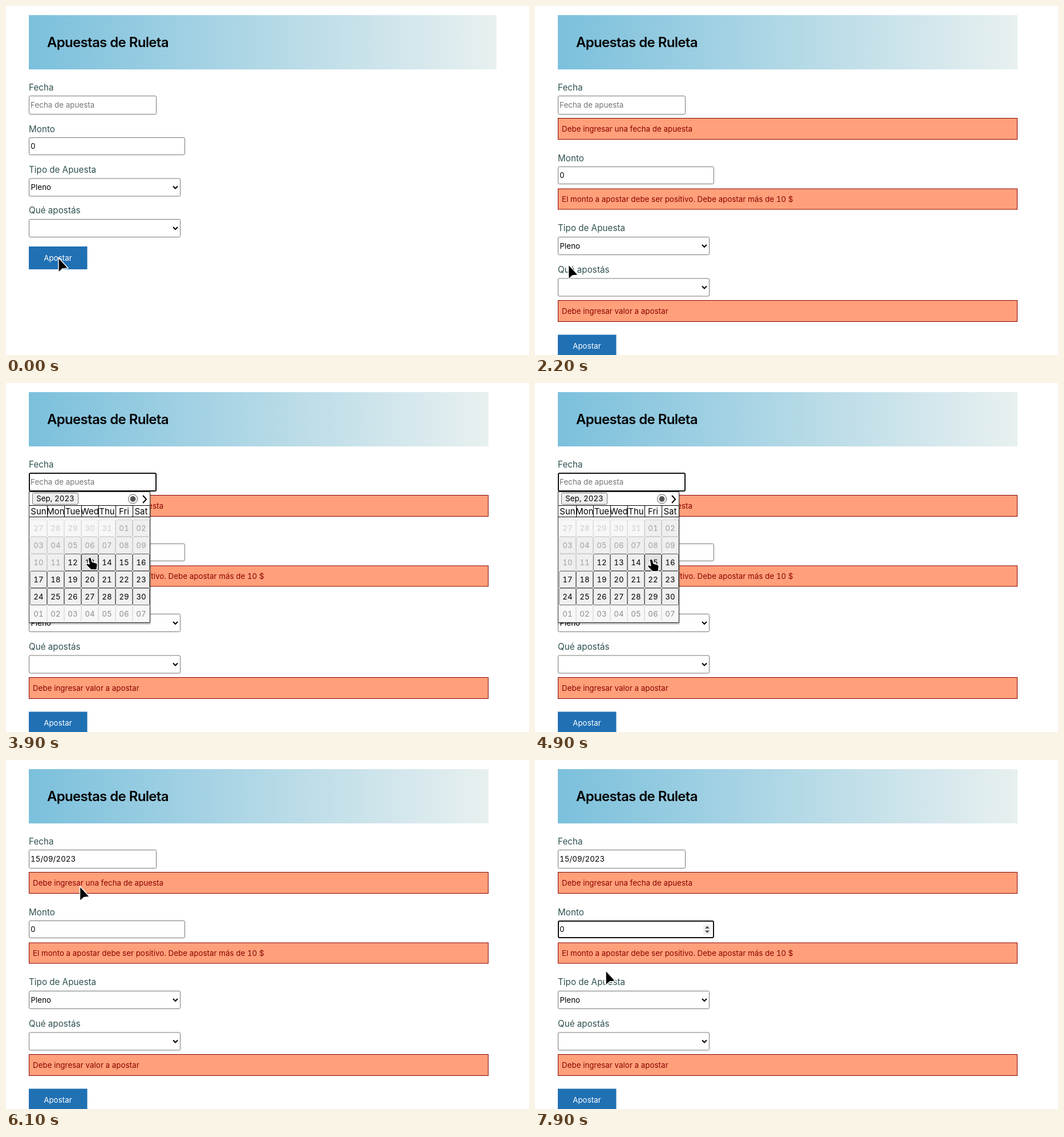
An HTML page that plays this animation: 917 px wide and 611 px high, repeating every 8000 ms.

```html
<!DOCTYPE html>
<html lang="es">
<head>
<meta charset="utf-8">
<title>Apuestas de Ruleta</title>
<style>
  html, body { margin: 0; width: 100%; height: 100%; overflow: hidden; background: #fff; }
  svg {
    display: block; width: 917px; height: 611px;
    font: 13.33px Inter, sans-serif; font-optical-sizing: none;
    font-variant-numeric: tabular-nums; letter-spacing: .05px;
  }
  .title { font-size: 24px; font-weight: 600; letter-spacing: -.7px; }
  .label { font-size: 15.2px; }
  .head { font-size: 15px; }
  .mid { text-anchor: middle; }
</style>
</head>
<body>
<svg viewBox="0 0 917 611">
  <defs>
    <linearGradient id="sky"><stop stop-color="#7bc0dc"/><stop offset="1" stop-color="#e8f0f0"/></linearGradient>
    <filter id="soft" x="-10%" y="-10%" width="120%" height="120%"><feGaussianBlur stdDeviation="1.6"/></filter>
  </defs>
  <g id="page"></g>
  <g id="cursor"></g>
</svg>
<script>
const LOOP = 8000, STEP = 100, BLINK = 600;
const ERRORS = 900, OPEN = 3100, PICKED = 5300, FOCUS = 7100;

const MOVES = [
  { from: 1600, to: 1800, x: 55, y: 556 },
  { from: 2100, to: 2400, x: 66, y: 247 },
  { from: 2500, to: 2900, x: 66, y: 175, ease: k => 1 - (1 - k) ** 4 },
  { from: 3600, to: 3900, x: 147, y: 306 },
  { from: 3900, to: 4400, x: 204, y: 309, ease: k => 1 - (1 - k) ** 2 },
  { from: 5200, to: 5500, x: 200, y: 304 },
  { from: 5500, to: 6300, x: 106, y: 194 },
  { from: 6300, to: 6700, x: 87, y: 289 },
  { from: 7500, to: 7900, x: 124, y: 369, ease: k => k ** 1.3 }
];

const page = document.getElementById('page');
const cursor = document.getElementById('cursor');

const rect = (x, y, w, h, fill, stroke = 'none', sw = stroke === 'none' ? 0 : 1, r = 0) =>
  `<rect x="${x + sw / 2}" y="${y + sw / 2}" width="${w - sw}" height="${h - sw}" rx="${r}" fill="${fill}" stroke="${stroke}" stroke-width="${sw}"/>`;
const text = (x, y, s, cls = '', fill = '#000') =>
  `<text x="${x}" y="${y}" class="${cls}" fill="${fill}">${s}</text>`;
const line = (d, w = 1, color = '#000') =>
  `<path d="${d}" fill="none" stroke="${color}" stroke-width="${w}"/>`;
const disc = (r, fill) =>
  `<circle cx="222.5" cy="203" r="${r}" fill="${fill}" stroke="#555"/>`;
const label = (y, s) => text(40, y, s, 'label', '#2f4f4f');
const inside = (p, x, y, w, h) => p.x >= x && p.x < x + w && p.y >= y && p.y < y + h;

function pointAt(t) {
  let p = { x: 92, y: 441 };
  for (const { from, to, x, y, ease = k => k } of MOVES) {
    if (t <= from) break;
    const k = ease(Math.min(1, (t - from) / (to - from)));
    p = { x: p.x + (x - p.x) * k, y: p.y + (y - p.y) * k };
  }
  return p;
}

function field(y, w, h, hover, focus) {
  return focus ? rect(40, y, w, h, '#fff', '#101010', 2, 2)
               : rect(40, y, w, h, '#fff', hover ? '#444' : '#767676', 1, 2);
}

function caret(x, y, since, t) {
  return Math.floor((t - since) / BLINK) % 2 ? '' : rect(x, y, 1, 16, '#000');
}

function select(y, value) {
  return field(y, 266, 32) + text(43.5, y + 20.5, value) + line(`M293 ${y + 14}l4 4 4-4`, 2);
}

function error(y, h, s) {
  return rect(40, y, 806, h, '#ffa07a', '#8b0000') + text(47, y + 23.5, s, '', '#8b0000');
}

function spinner(y) {
  return rect(295, y + 7, 14, 17, '#efefef') +
    `<path d="M298 ${y + 14}l4-4.5 4 4.5zM298 ${y + 17.5}l4 4.5 4-4.5z" fill="#505050"/>`;
}

function dayCell(i, p) {
  const x = 42 + i % 7 * 30, y = 239 + Math.floor(i / 7) * 30, n = i - 4;
  const before = n < 1, after = n > 30, other = before || after, off = other || n < 12;
  const day = before ? n + 31 : after ? n - 30 : n;
  const hover = !off && inside(p, x, y, 30, 30);
  const bg = hover ? '#e3e3e3' : other ? '#f7f7f7' : '#efefef';
  const edge = hover ? '#444' : other ? '#e2e2e2' : off ? '#cfcfcf' : '#767676';
  const ink = before ? '#cdcdcd' : after ? '#8c8c8c' : off ? '#a0a0a0' : '#000';
  return rect(x, y, 30, 30, bg, edge, 1, 1.5) +
    text(x + 15, y + 19.8, String(day).padStart(2, '0'), 'mid', ink);
}

function calendar(p) {
  let s = '<rect x="41" y="192" width="212" height="230" opacity=".35" filter="url(#soft)"/>' +
    rect(40, 190, 213, 230, '#fff', '#333') +
    rect(46, 192, 81, 21, '#efefef', '#767676', 1, 2) + text(86.5, 207, 'Sep, 2023', 'mid') +
    disc(8, '#fff') + disc(4.5, '#555') +
    line('M240 197l6 6.5-6 6.5', 2) + line('M41 214.5H252M41 234.5H252');
  'Sun Mon Tue Wed Thu Fri Sat'.split(' ').forEach((d, i) => {
    s += text(57 + i * 30, 230, d, 'head mid') + line(`M${72.5 + i * 30} 215v20`);
  });
  for (let i = 0; i < 42; i++) s += dayCell(i, p);
  return s;
}

function drawPage(t, p) {
  const bad = t >= ERRORS, open = t >= OPEN && t < PICKED, picked = t >= PICKED, focus = t >= FOCUS;
  const [amount, kind, bet, send] = bad ? [281, 404, 476.5, 575.5] : [230, 301.5, 373, 421];
  const onAmount = !open && inside(p, 40, amount, 274, 31);
  return rect(40, 16, bad ? 806 : 820, 95, 'url(#sky)') +
    text(72, 72, 'Apuestas de Ruleta', 'title') +
    label(147.5, 'Fecha') + field(157, 224, 33, inside(p, 40, 157, 224, 33), open) +
    (picked ? text(43, 178, '15/09/2023') : text(43, 178, 'Fecha de apuesta', '', '#757575')) +
    (open ? caret(44, 165, OPEN, t) : '') +
    label(amount - 9.5, 'Monto') + field(amount, 274, 31, onAmount, focus) +
    text(43, amount + 20.3, '0') + (onAmount || focus ? spinner(amount) : '') +
    (focus ? caret(52, amount + 8, FOCUS, t) : '') +
    label(kind - 10, 'Tipo de Apuesta') + select(kind, 'Pleno') +
    label(bet - 9.8, 'Qué apostás') + select(bet, '') +
    rect(40, send, 102.5, 40, '#2070b4') + text(91, send + 24.6, 'Apostar', 'mid', '#fff') +
    (bad ? error(196, 38, 'Debe ingresar una fecha de apuesta') +
      error(319.5, 37, 'El monto a apostar debe ser positivo. Debe apostar más de 10 $') +
      error(515, 38, 'Debe ingresar valor a apostar') : '') +
    (open ? calendar(p) : '');
}

const solid = d =>
  `<path d="${d}" stroke="#fff" stroke-width="1.4" stroke-linejoin="round"/>`;
const BAR = 'M-4-9h2.5q1.5 0 1.5 2V7q0 2-1.5 2H-4M4-9H1.5Q0-9 0-7V7q0 2 1.5 2H4';
const SHAPES = {
  arrow: solid('M0-.5V25.5L7 19 17 18Z'),
  beam: line(BAR, 4, '#fff') + line(BAR, 2),
  hand: solid('M-3 1Q-1-2 2 0L4 7 11 9Q14 10 13 14L12 21H2L-6 13Q-7 9-3 10L-1 11Z')
};

function shapeAt(t, p) {
  const open = t >= OPEN && t < PICKED;
  if (inside(p, 40, 157, 224, 33)) return 'beam';
  if (open) return inside(p, 42, 299, 210, 90) ? 'hand' : 'arrow';
  return inside(p, 40, t < ERRORS ? 230 : 281, 274, 31) ? 'beam' : 'arrow';
}

let shown = -1;
function update(now) {
  const t = Math.floor(now % LOOP / STEP) * STEP;
  if (t === shown) return;
  shown = t;
  const p = pointAt(t);
  page.innerHTML = drawPage(t, p);
  cursor.innerHTML = SHAPES[shapeAt(t, p)];
  cursor.setAttribute('transform', `translate(${p.x} ${p.y})`);
}

const start = performance.now();
function tick() {
  update(performance.now() - start);
  requestAnimationFrame(tick);
}
tick();
</script>
</body>
</html>
```
